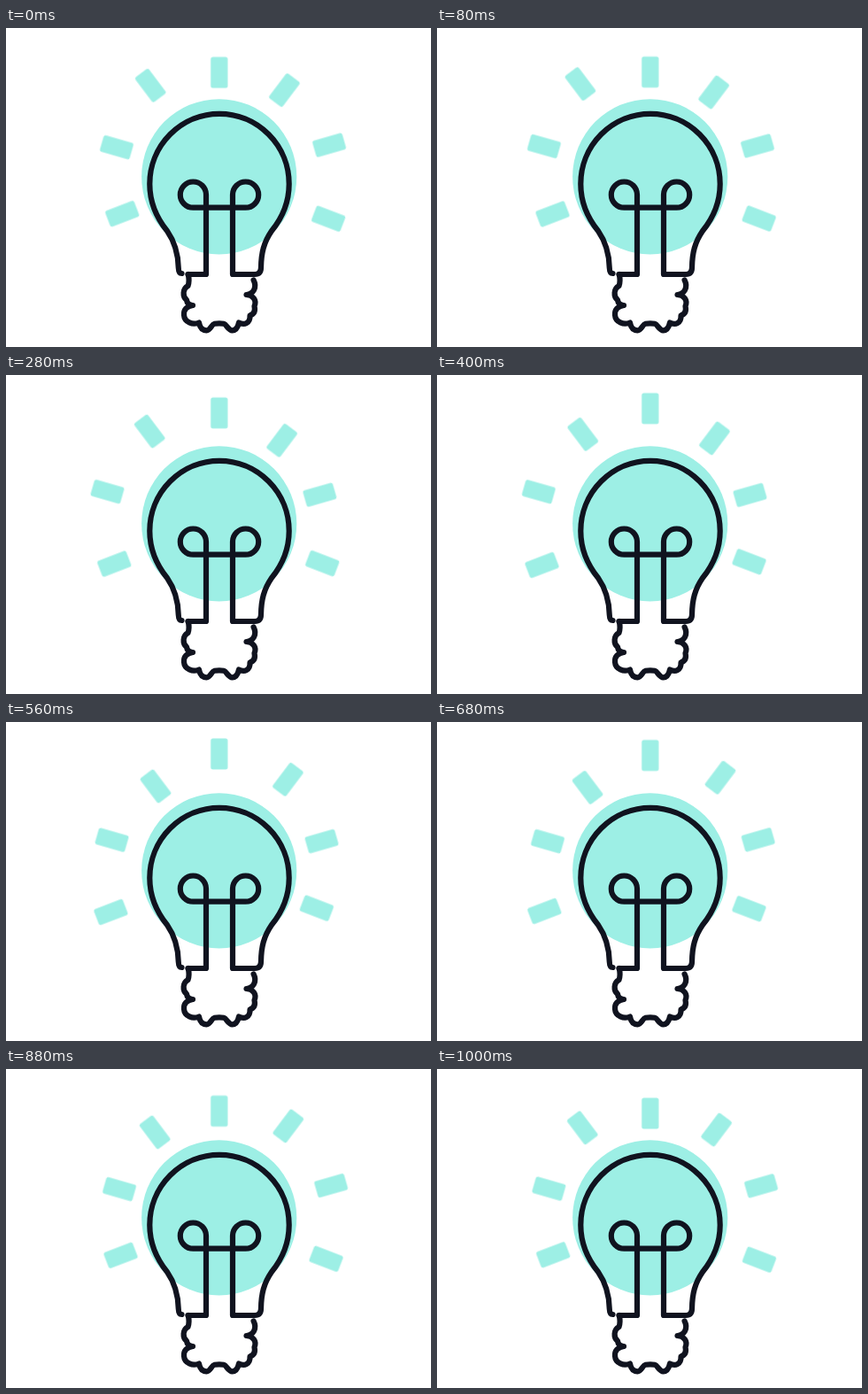
Animation, 480 px wide and 360 px high, one loop 1.04 s. Source, as an HTML page:

```html
<!DOCTYPE html>
<html lang="en">
<head>
<meta charset="utf-8">
<title>Light bulb</title>
<style>
  html, body { margin: 0; width: 100%; height: 100%; overflow: hidden; background: #fff; }
  svg { display: block; width: 480px; height: 360px; }
  .glow { fill: #9defe5; }
  .line { fill: none; stroke: #10131f; stroke-width: 6.2; stroke-linecap: round; stroke-linejoin: round; }

  /* Each ray slides along its own axis, out and back. */
  .ray {
    --reach: 7.1px;
    animation: slide 1040ms cubic-bezier(.5, 0, .5, 1) var(--delay, 0ms) infinite;
  }
  @keyframes slide {
    0%, 100% { transform: translateY(calc(var(--reach) * -1)); }
    53% { transform: translateY(var(--reach)); }
  }
</style>
</head>
<body>
<svg viewBox="0 0 480 360">
  <defs>
    <rect id="bar" x="-9.6" y="-17.6" width="19.2" height="35.2" rx="2.5"/>
  </defs>

  <g class="glow">
    <circle cx="240.7" cy="167.8" r="87.6"/>
    <g transform="translate(240.8 43.1)"><use class="ray" href="#bar" style="--reach:-7.1px"/></g>
    <g transform="translate(165.8 68.3) rotate(-37)"><use class="ray" href="#bar" style="--delay:-880ms"/></g>
    <g transform="translate(315.8 68.3) rotate(37)"><use class="ray" href="#bar" style="--delay:-320ms"/></g>
    <g transform="translate(121.2 133.6) rotate(-74)"><use class="ray" href="#bar" style="--delay:-720ms"/></g>
    <g transform="translate(360.3 133.5) rotate(74)"><use class="ray" href="#bar" style="--delay:-160ms"/></g>
    <g transform="translate(124.6 212.2) rotate(-111)"><use class="ray" href="#bar" style="--delay:-560ms"/></g>
    <g transform="translate(357.5 212.7) rotate(111)"><use class="ray" href="#bar"/></g>
  </g>

  <g class="line">
    <!-- glass and filament -->
    <path d="M198.5 277 Q195 277 194.8 271 C194.5 254 191 242 182 229
             C169 213 162.3 195 162.3 176 A78.7 79.2 0 0 1 319.7 176
             C319.7 195 313 213 300 229 C291 242 288.3 254 288 270
             Q288 278 281 278 H256 V188 A14.6 14.6 0 1 1 270.6 202.7 H211.4
             A14.6 14.6 0 1 1 226 188 V278 H205.5"/>
    <!-- screw base -->
    <path d="M205.8 278 Q207.5 286 205.5 291 C199.5 294 199 303 204 307
             C204.5 311 207 313 211 313 C204 314 200.5 318 201 324
             C201.5 332 211 335.5 218 332.5 C219 338 222 341.3 226.5 341.3
             C231 341.3 232 334.5 235.5 333.8 Q241 332.8 246 333.8
             C249 334.5 251 341.3 255.5 341.3 C260 341.3 262 337 263 332.5
             C269 335.5 276 333.5 275.5 324.5 C281 322.5 281.5 318 280.5 314
             C283.5 307 279 301.5 271.5 301
             C279 300.5 284 293 279.6 284.5"/>
  </g>
</svg>
</body>
</html>
```
